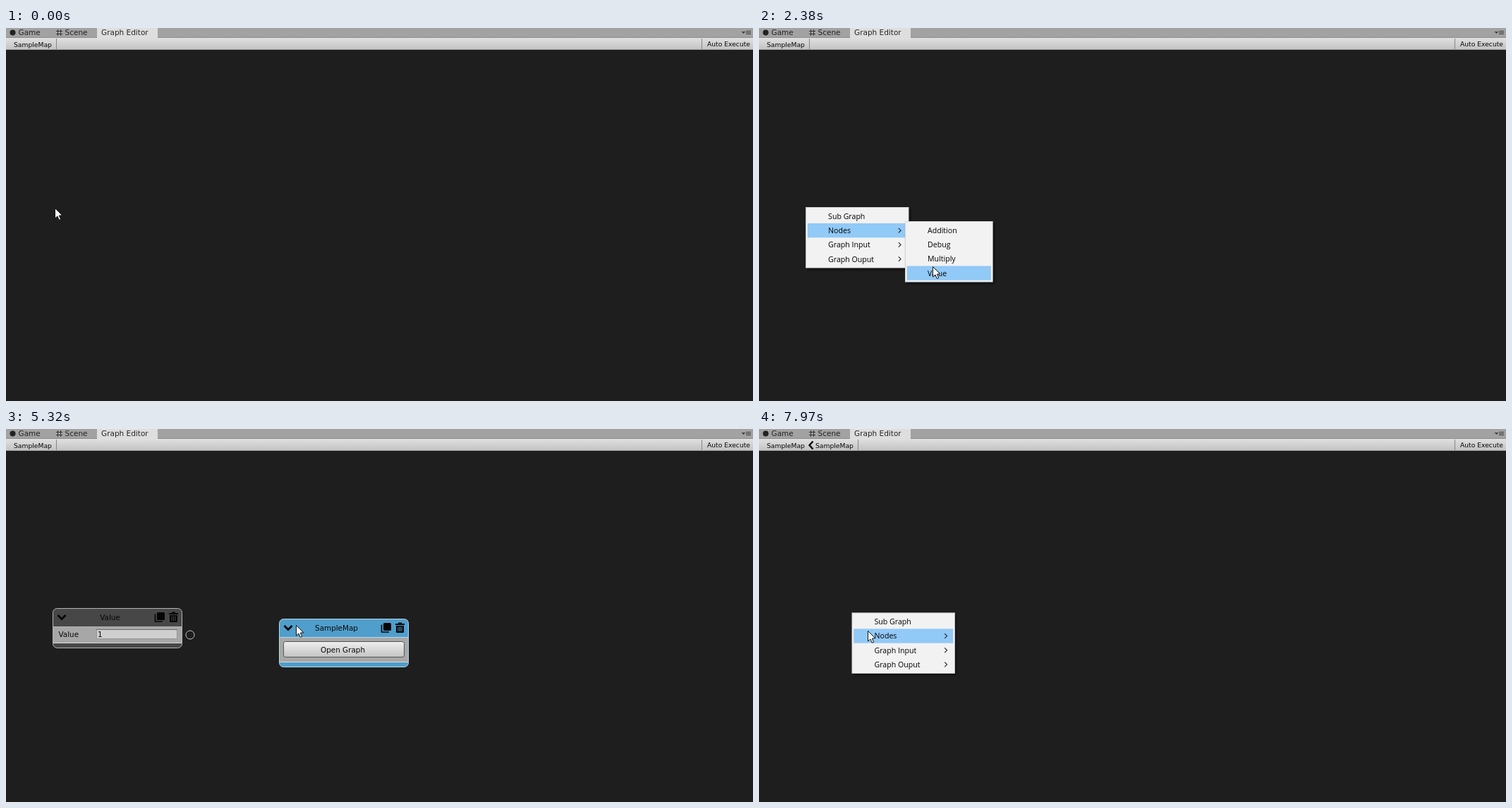
An HTML page with a canvas that plays this animation: 1059 px wide and 529 px high, repeating every 8000 ms.

```html
<!DOCTYPE html>
<html lang="en">
<head>
<meta charset="utf-8">
<title>Graph Editor</title>
<style>
  html, body { margin: 0; width: 100%; height: 100%; overflow: hidden; background: #1e1e1e; }
  canvas { display: block; }
</style>
</head>
<body>
<canvas id="stage" width="1059" height="529"></canvas>
<script>
const ctx = document.getElementById('stage').getContext('2d');
const LOOP = 8000;
const STEP = 77;
const PRESS = 150;         // how long a click stays marked
const ROW = 20.25;
const PAD = 2.75;
const MENU_H = 4 * ROW + 2 * PAD;
const UI = '"DejaVu Sans", sans-serif';
const MENU_FONT = '10.6px "Open Sans", sans-serif';
const NODE_FONT = '10.4px ' + UI;
const INK = '#060606';
const GRAPH = 'SampleMap';

const mainItems = ['Sub Graph', 'Nodes', 'Graph Input', 'Graph Ouput'];
const nodeItems = ['Addition', 'Debug', 'Multiply', 'Value'];

const home = { x: 69, y: 255 };
const moves = [
  { start: 360, end: 360, x: 66, y: 254 },
  { start: 1080, end: 1310, x: 112, y: 284 },
  { start: 1610, end: 1990, x: 224, y: 293 },
  { start: 2070, end: 2380, x: 246, y: 338 },
  { start: 2460, end: 2540, x: 247, y: 342 },
  { start: 3460, end: 3840, x: 387, y: 269 },
  { start: 4480, end: 4630, x: 411, y: 278 },
  { start: 5870, end: 6100, x: 449, y: 316 },
  { start: 6730, end: 7280, x: 131, y: 260 },
  { start: 7810, end: 7970, x: 154, y: 286 }
];
const clicks = [610, 2610, 4010, 4940, 6180, 7430];

const mainMenu = (x, y, open, close) => ({ x, y, w: 146.4, items: mainItems, arrows: true, open, close });
const menus = [
  mainMenu(66.1, 254, 760, 2690),
  { x: 207, y: 274, w: 124.7, items: nodeItems, open: 1610, close: 2690 },
  mainMenu(387, 268.4, 4160, 5090),
  mainMenu(131.5, 260.4, 7580, LOOP)
];
const [firstMenu, nodeMenu] = menus;

const clamp = v => Math.max(0, Math.min(1, v));
const ease = f => f * f * (3 - 2 * f);
const between = (t, a, b) => t >= a && t < b;
const ticks = (t, start) => Math.floor((t - start + 4) / STEP);

function pointer(t) {
  let { x, y } = home;
  for (const m of moves) {
    if (t < m.start) break;
    const count = Math.round((m.end - m.start) / STEP) + 1;
    const f = ease(clamp((ticks(t, m.start) + 1) / count));
    x += (m.x - x) * f;
    y += (m.y - y) * f;
  }
  return { x, y };
}

function rect(x, y, w, h, fill) {
  ctx.fillStyle = fill;
  ctx.fillRect(x, y, w, h);
}

function text(str, x, y, font, color = INK, align = 'left') {
  ctx.font = font;
  ctx.fillStyle = color;
  ctx.textAlign = align;
  ctx.fillText(str, x, y);
}

function line(points, color, width) {
  ctx.beginPath();
  points.forEach(([x, y]) => ctx.lineTo(x, y));
  ctx.strokeStyle = color;
  ctx.lineWidth = width;
  ctx.stroke();
}

function disc(x, y, r, fill, stroke) {
  ctx.beginPath();
  ctx.arc(x, y, r, 0, Math.PI * 2);
  paint(fill, stroke);
}

function roundRect(x, y, w, h, r, fill, stroke) {
  ctx.beginPath();
  ctx.roundRect(x, y, w, h, r);
  paint(fill, stroke);
}

function paint(fill, stroke) {
  if (fill) { ctx.fillStyle = fill; ctx.fill(); }
  if (stroke) { ctx.strokeStyle = stroke; ctx.lineWidth = 1; ctx.stroke(); }
}

function shade(y0, y1, from, to) {
  const g = ctx.createLinearGradient(0, y0, 0, y1);
  g.addColorStop(0, from);
  g.addColorStop(1, to);
  return g;
}

// A chevron bent at (x, y); dx and dy point back to its two ends.
function chevron(x, y, dx, dy, color, width, down) {
  const ends = down ? [[x - dx, y - dy], [x + dx, y - dy]] : [[x + dx, y - dy], [x + dx, y + dy]];
  line([ends[0], [x, y], ends[1]], color, width);
}

function drawWindow(inner) {
  rect(0, 0, 1059, 529, '#1e1e1e');
  rect(0, 0, 1059, 14, '#a2a2a2');
  rect(0, 13, 1059, 1, '#8c8c8c');
  rect(129, 0, 86, 14, '#dedede');
  rect(0, 14, 1059, 16, shade(14, 30, '#e0e0e0', '#c4c4c4'));
  rect(0, 30, 1059, 1, '#a0a0a0');

  const tab = '10.5px ' + UI;
  disc(9.5, 6.5, 4, '#222');
  for (const d of [0, 4]) {
    line([[73.5 + d, 2], [73.5 + d, 11]], '#333', 1);
    line([[71, 4.5 + d], [80, 4.5 + d]], '#333', 1);
  }
  text('Game', 17.5, 10, tab, '#242424');
  text('Scene', 83.5, 10, tab, '#242424');
  text('Graph Editor', 135, 10, tab, '#242424');

  for (let i = 0; i < 3; i++) {
    rect(1043 + i, 5 + i, 5 - 2 * i, 1, '#444');
    rect(1049, 4 + 2 * i, 7, 1, '#444');
  }

  const bar = '9.2px ' + UI;
  text(GRAPH, 11, 27, bar);
  if (inner) {
    chevron(71.5, 23, 5, 5.5, INK, 2.4);
    text(GRAPH, 80, 27, bar);
  }
  rect(inner ? 140 : 71, 15, 1, 15, '#868686');
  rect(986, 15, 1, 15, '#868686');
  text('Auto Execute', 1055, 26, bar, INK, 'right');
}

function drawNode(x, y, h, title, color, edge) {
  roundRect(x + .5, y + .5, 183, h - 1, 6, color);
  rect(x + 1, y + 27, 182, h - 35, '#a7a7a7');
  rect(x + 1, y + 26, 182, 1, edge);
  rect(x + 1, y + h - 8, 182, 1, '#d8d8d8');
  roundRect(x + .5, y + .5, 183, h - 1, 6, null, edge);

  chevron(x + 13, y + 15.5, 5.5, 5.5, INK, 2.8, true);
  text(title, x + 81.5, y + 16.8, NODE_FONT, INK, 'center');

  roundRect(x + 148, y + 6, 11, 11, 1.5, INK);
  line([[x + 145.5, y + 8.5], [x + 145.5, y + 19], [x + 156, y + 19]], INK, 1.6);

  const bin = x + 165;
  rect(bin, y + 7, 13, 2, INK);
  rect(bin + 4, y + 5.5, 5, 2, INK);
  roundRect(bin + 1, y + 10, 11, 10, [0, 0, 1.5, 1.5], INK);
  for (let i = 0; i < 3; i++) rect(bin + 3.5 + 2.5 * i, y + 11.5, 1, 6.5, color);
}

function drawValueNode() {
  drawNode(66, 254, 57, 'Value', '#474747', '#b4b4b4');
  text('Value', 74.5, 295, NODE_FONT);
  roundRect(128.5, 284.5, 114, 13, 0, '#cfcfcf', '#979797');
  rect(128, 284, 115, 1, '#6c6c6c');
  text('1', 130, 295, NODE_FONT);
  disc(261, 292, 6, null, '#c4c4c4');
}

function drawGraphNode(pressed) {
  drawNode(387, 269, 69, GRAPH, '#509ecb', '#b4d7ea');
  const fill = pressed ? shade(301, 324, '#b4b4b4', '#a2a2a2') : shade(301, 324, '#f0f0f0', '#c2c2c2');
  roundRect(393.5, 301.5, 171, 22, 3, fill, '#555');
  text('Open Graph', 477.5, 317, NODE_FONT, INK, 'center');
}

const isOpen = (menu, t) => between(t, menu.open, menu.close);

function rowAt(menu, p) {
  const inside = p.x > menu.x + PAD && p.x < menu.x + menu.w - PAD;
  return inside ? Math.floor((p.y - menu.y - PAD) / ROW) : -1;
}

// Opens with a quick fade; after the choice only the chosen row fades away.
function drawMenu(menu, t, p) {
  if (t < menu.open) return;
  const { x, y, w } = menu;
  const open = isOpen(menu, t);
  let lit = rowAt(menu, p);
  if (menu === firstMenu && isOpen(nodeMenu, t)) lit = mainItems.indexOf('Nodes');

  ctx.save();
  ctx.globalAlpha = open
    ? 1 - .4 * .1 ** ticks(t, menu.open)
    : clamp(.7 - .35 * ticks(t, menu.close));
  if (open) {
    ctx.save();
    ctx.shadowColor = 'rgba(0,0,0,.5)';
    ctx.shadowBlur = 3;
    ctx.shadowOffsetX = ctx.shadowOffsetY = 2;
    rect(x, y, w, MENU_H, '#d2d2d2');
    ctx.restore();
    rect(x + .9, y + .9, w - 1.8, MENU_H - 1.8, '#f2f2f2');
  }
  menu.items.forEach((item, i) => {
    if (!open && i !== lit) return;
    const top = y + PAD + i * ROW;
    if (i === lit) rect(x + PAD, top, w - 2 * PAD, ROW, '#91c9f7');
    text(item, x + 32, Math.round(top + 14), MENU_FONT, '#000');
    if (menu.arrows && i) chevron(x + 135, top + ROW / 2, -3.3, 3.3, '#222', 1.1);
  });
  ctx.restore();
}

function drawPointer(p) {
  const shape = [[0, 0], [0, 14.5], [3.4, 11.4], [5.8, 16.8], [8.2, 15.8], [5.8, 10.6], [10.3, 10.3]];
  ctx.beginPath();
  shape.forEach(([x, y]) => ctx.lineTo(Math.round(p.x) + x + .5, Math.round(p.y) + y + .5));
  ctx.closePath();
  paint('#fff', '#111');
}

function draw(t) {
  const p = pointer(t);
  const pressed = clicks.some(c => between(t, c, c + PRESS));
  const inner = t >= 6410;

  drawWindow(inner);
  if (t >= 2930 && !inner) drawValueNode();
  if (t >= 5250 && !inner) drawGraphNode(pressed);
  menus.forEach(menu => drawMenu(menu, t, p));
  drawPointer(p);
  if (pressed) disc(p.x + .5, p.y + .5, 11, 'rgba(255,240,0,.48)');
}

const begin = performance.now();
function tick() {
  draw((performance.now() - begin) % LOOP);
  requestAnimationFrame(tick);
}
tick();
</script>
</body>
</html>
```
